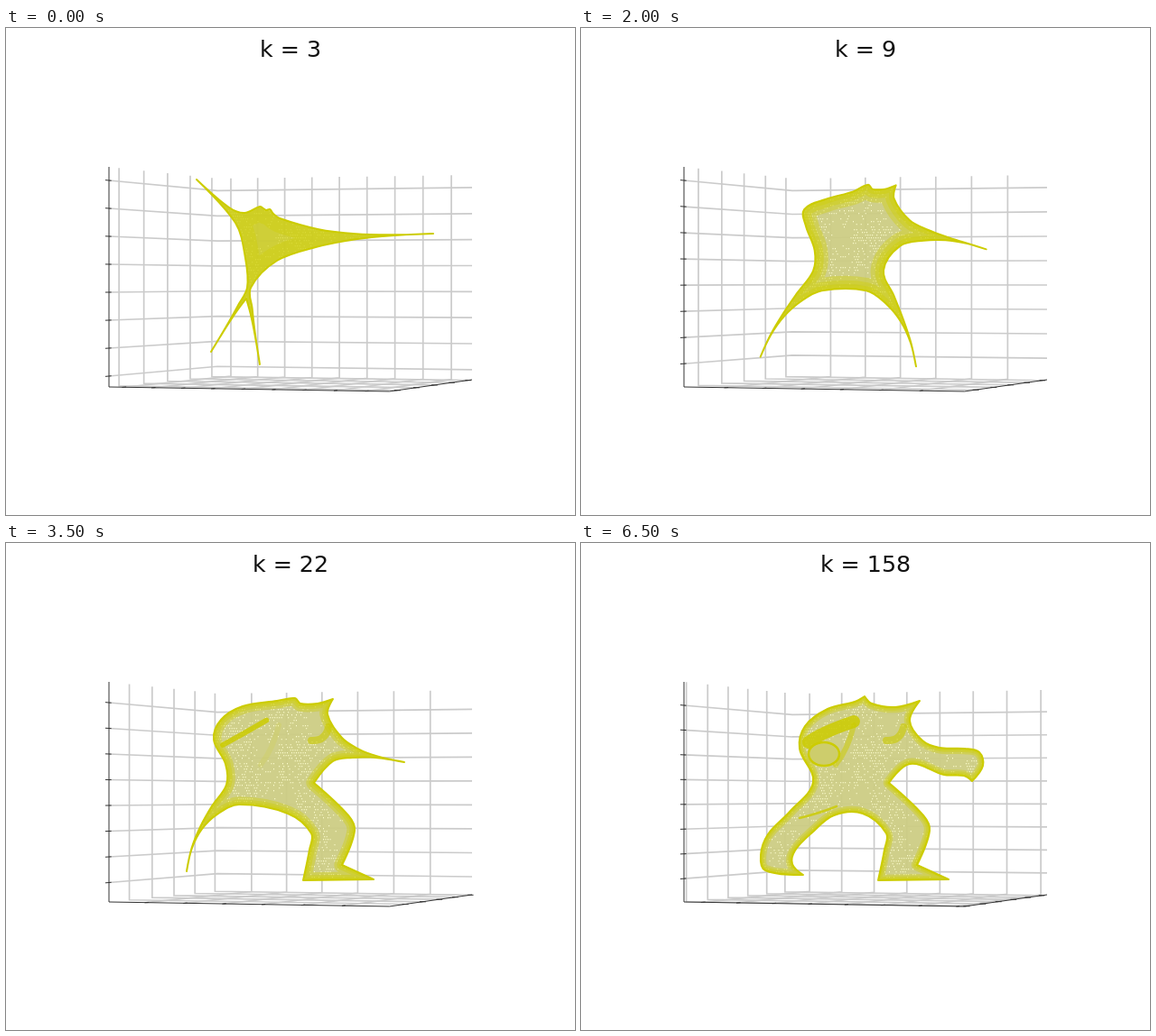
Recreate the animation shown at these times as an HTML page with a canvas. Size 630 px wide and 540 px high, loop 7 s.

```html
<!DOCTYPE html>
<html lang="en">
<head>
<meta charset="utf-8">
<title>Mesh reconstruction</title>
<style>
html, body { margin: 0; width: 100%; height: 100%; overflow: hidden; background: #fff; }
canvas { display: block; }
</style>
</head>
<body>
<canvas id="stage" width="630" height="540"></canvas>
<script>
const ctx = document.getElementById('stage').getContext('2d');
const STEP_MS = 500, STEPS = 14, OLIVE = '#cccc00';

const mix = (a, b, f) => a + (b - a) * f;
const mixPoint = (p, q, f) => [mix(p[0], q[0], f), mix(p[1], q[1], f)];
const ramp = (x, from, to) => Math.min(1, Math.max(0, (x - from) / (to - from)));

function countAt(step) {
  let k = 3;
  while (step--) k = Math.floor(k * 1.4 + 1e-9);
  return k;
}

// ---- Perspective box ----

// Three corners of the floor: x, y and height of the wall there.
const LEFT = [114, 398, 244], BACK = [234, 386, 219], RIGHT = [516, 390, 227];

// Step, then first tick and spacing for z (px), u (left wall) and v (right wall).
const scales = [
  [0, 169, 31, -.131, .215, .055, .1083],
  [2, 165, 30.7, -.11, .186, .026, .139],
  [5, 171, 28.2, -.068, .212, .011, .139],
  [7, 177, 28.5, -.029, .201, -.002, .1405],
  [9, 174, 28.8, -.016, .197, .07, .1295],
  [13, 180, 27.45, .02, .181, .07, .1295]
];

function scaleAt(step) {
  const a = scales.findLast(s => s[0] <= step), b = scales.find(s => s[0] >= step);
  return a.map((value, i) => mix(value, b[i], a === b ? 0 : ramp(step, a[0], b[0])));
}

// u runs from the left corner to the back, v from the back to the right, z downward.
function project(u, v, z = 1) {
  let x = 0, y = 0, w = 0;
  [[LEFT, 1 - u], [BACK, u - v], [RIGHT, v]].forEach(([c, share]) => {
    const weight = share / c[2];
    x += c[0] * weight;
    y += (c[1] - (1 - z) * c[2]) * weight;
    w += weight;
  });
  return [x / w, y / w];
}

function line(color, width, ...points) {
  ctx.beginPath();
  points.forEach(p => ctx.lineTo(...p));
  ctx.strokeStyle = color;
  ctx.lineWidth = width;
  ctx.stroke();
}

function ticks(first, spacing) {
  return Array.from({ length: 12 }, (_, i) => first + i * spacing).filter(t => t > .018 && t < .981);
}

function drawBox([, z0, dz, u0, du, v0, dv]) {
  const grid = (...points) => line('#cbcbcb', 1.7, ...points);
  const axis = (...points) => line('#333', 1, ...points);
  const us = ticks(u0, du), vs = ticks(v0, dv), zs = ticks((z0 - 154) / 244, dz / 244);
  us.forEach(u => grid(project(u, 0, 0), project(u, 0), project(u, 1)));
  vs.forEach(v => grid(project(1, v, 0), project(1, v), project(0, v)));
  zs.forEach(z => grid(project(0, 0, z), project(1, 0, z), project(1, 1, z)));

  axis(project(0, 0, 0), project(0, 0), project(0, 1), project(1, 1));
  zs.forEach(z => axis(project(-.03, 0, z), project(.02, 0, z)));
  us.forEach(u => axis(project(u, .99), project(u, 1.012)));
  vs.forEach(v => axis(project(-.015, v), project(.02, v)));
}

// ---- Figure ----

// A thin limb: two root points, a tip and a sideways bend, as nine outline points.
function spike(rootA, rootB, tip, bend = 0) {
  const root = mixPoint(rootA, rootB, .5);
  const [dx, dy] = [tip[0] - root[0], tip[1] - root[1]];
  const length = Math.hypot(dx, dy);
  const side = (edge, s) => {
    const center = mixPoint(root, tip, s), width = (1 - s) ** 3, bow = 4 * s * (1 - s) * bend / length;
    return [center[0] + (edge[0] - root[0]) * width + dy * bow,
            center[1] + (edge[1] - root[1]) * width - dx * bow];
  };
  return Array.from({ length: 9 }, (_, i) => side(i < 4 ? rootA : rootB, 1 - Math.abs(i - 4) / 4));
}

// Parts in clockwise order. Three early shapes (steps 0, 2 and 5) and the full one,
// which unfolds within two steps after `unfold`.
const parts = [
  { unfold: 7, shapes: [ // head with two ears
    [[281, 198], [285, 200], [288, 202], [292, 201], [296, 206]],
    [[314, 177], [316, 180], [319, 180], [322, 177], [328, 188]],
    [[320, 172], [326, 178], [345, 178], [362, 173], [356, 190]],
    [[314, 170], [322, 178], [348, 182], [375, 175], [364, 197]]] },
  { unfold: 7, shapes: [ // stretched arm
    spike([303, 211], [300, 258], [473, 228]),
    spike([348, 208], [336, 241], [464, 250], 9),
    spike([372, 216], [362, 242], [441, 243]),
    [[378, 219], [397, 227], [425, 228], [441, 232], [445, 247], [433, 264], [424, 258],
     [402, 257], [364, 245]]] },
  { unfold: 5, shapes: [ // right leg
    spike([271, 288], [266, 300], [281, 373]),
    spike([329, 270], [312, 294], [381, 374]),
    spike([338, 268], [318, 290], [366, 376], 12),
    [[341, 266], [379, 302], [386, 319], [372, 357], [407, 373], [329, 374], [336, 340],
     [338, 322], [312, 300]]] },
  { unfold: 7, shapes: [ // left leg
    spike([266, 300], [267, 288], [227, 359]),
    spike([284, 294], [283, 272], [196, 366]),
    spike([258, 290], [244, 268], [200, 364], -11),
    [[280, 302], [256, 321], [237, 341], [234, 356], [246, 368], [204, 363], [199, 346],
     [207, 323], [231, 298]]] },
  { unfold: 7, shapes: [ // back and folded arm
    [[265, 255], [254, 216], [211, 168], [247, 199], [264, 205]],
    [[290, 250], [287, 223], [265, 212], [288, 208], [304, 194]],
    [[243, 245], [230, 218], [238, 196], [262, 181], [300, 175]],
    [[257, 265], [242, 228], [248, 203], [273, 184], [303, 176]]] }
];

function outlineAt(step) {
  return parts.flatMap(({ unfold, shapes: [star, web, spiky, full] }) => star.map((p, i) => {
    p = mixPoint(p, web[i], ramp(step, 0, 2));
    p = mixPoint(p, spiky[i], ramp(step, 2, 5));
    return mixPoint(p, full[i], ramp(step, unfold, unfold + 2));
  }));
}

// Closed curve: smooth through gentle turns, pointed at sharp ones.
function smoothPath(points) {
  const n = points.length;
  const at = i => points[(i + n) % n];
  const unit = (p, q) => {
    const d = Math.hypot(q[0] - p[0], q[1] - p[1]) || 1;
    return [(q[0] - p[0]) / d, (q[1] - p[1]) / d];
  };
  const tangent = i => {
    const a = unit(at(i - 1), at(i)), b = unit(at(i), at(i + 1));
    return a[0] * b[0] + a[1] * b[1] < .3 ? [0, 0] : unit(at(i - 1), at(i + 1));
  };
  const path = new Path2D();
  path.moveTo(...at(0));
  for (let i = 0; i < n; i++) {
    const p = at(i), q = at(i + 1), s = tangent(i), e = tangent(i + 1);
    const h = Math.hypot(q[0] - p[0], q[1] - p[1]) / 3;
    path.bezierCurveTo(p[0] + s[0] * h, p[1] + s[1] * h, q[0] - e[0] * h, q[1] - e[1] * h, ...q);
  }
  path.closePath();
  return path;
}

function noise(x, y) {
  const s = Math.sin(x * 12.9898 + y * 78.233) * 43758.5453;
  return s - Math.floor(s);
}

function drawSpeckles() {
  ctx.fillStyle = '#ffffd2';
  for (let y = 172; y < 376; y += 3) {
    for (let x = 196; x < 450; x += 2.5) {
      const patch = .3 + .25 * Math.sin(x / 13 + y / 29) * Math.cos(y / 17 - x / 41);
      if (noise(x, y) < patch) ctx.fillRect(x + (y % 2) * 1.2, y, 1, 1.3);
    }
  }
}

function curve(width, alpha, from, control, to) {
  ctx.globalAlpha = alpha;
  ctx.lineWidth = width;
  ctx.beginPath();
  ctx.moveTo(...from);
  ctx.quadraticCurveTo(...control, ...to);
  ctx.stroke();
}

function drawFolds(step) {
  const grown = ramp(step, 6, 10), hand = ramp(step, 7, 10);
  if (step >= 5) {
    curve(mix(3, 14, grown), .85, mixPoint([236, 225], [252, 221], grown), [264, 211],
      mixPoint([284, 196], [302, 198], grown));
    curve(8, .6, [338, 219], [354, 220], [357, 204]);
  }
  curve(6, grown * .5, [302, 202], [296, 228], [282, 246]);
  curve(2.5, grown * .8, [242, 305], [266, 299], [283, 292]);
  if (!hand) return;
  ctx.globalAlpha = 1;
  ctx.fillStyle = '#cdcd6c';
  ctx.beginPath();
  ctx.ellipse(269, 234, 17 * hand, 13 * hand, 0, 0, Math.PI * 2);
  ctx.fill();
  ctx.stroke();
}

function drawFigure(step) {
  const body = smoothPath(outlineAt(step));
  const rim = 12 + 78 * Math.exp(-step / 2.6);
  ctx.save();
  ctx.lineJoin = ctx.lineCap = 'round';
  ctx.save();
  ctx.clip(body);
  ctx.globalAlpha = .95;
  ctx.fillStyle = '#cdcd84';
  ctx.fill(body);
  drawSpeckles();
  ctx.strokeStyle = OLIVE;
  ctx.globalAlpha = .36;
  [1, .65, .35].forEach(share => {
    ctx.lineWidth = rim * share;
    ctx.stroke(body);
  });
  drawFolds(step);
  ctx.restore();
  ctx.strokeStyle = OLIVE;
  ctx.lineWidth = 2;
  ctx.stroke(body);
  ctx.restore();
}

function draw(step) {
  ctx.fillStyle = '#fff';
  ctx.fillRect(0, 0, 630, 540);
  ctx.fillStyle = '#111';
  ctx.font = '25.3px "DejaVu Sans", sans-serif';
  ctx.textAlign = 'center';
  ctx.fillText('k = ' + countAt(step), 315, 32.4);
  drawBox(scaleAt(step));
  drawFigure(step);
}

let shown = -1;
function tick() {
  const step = Math.floor(performance.now() / STEP_MS) % STEPS;
  if (step !== shown) draw(shown = step);
  requestAnimationFrame(tick);
}
tick();
</script>
</body>
</html>
```
